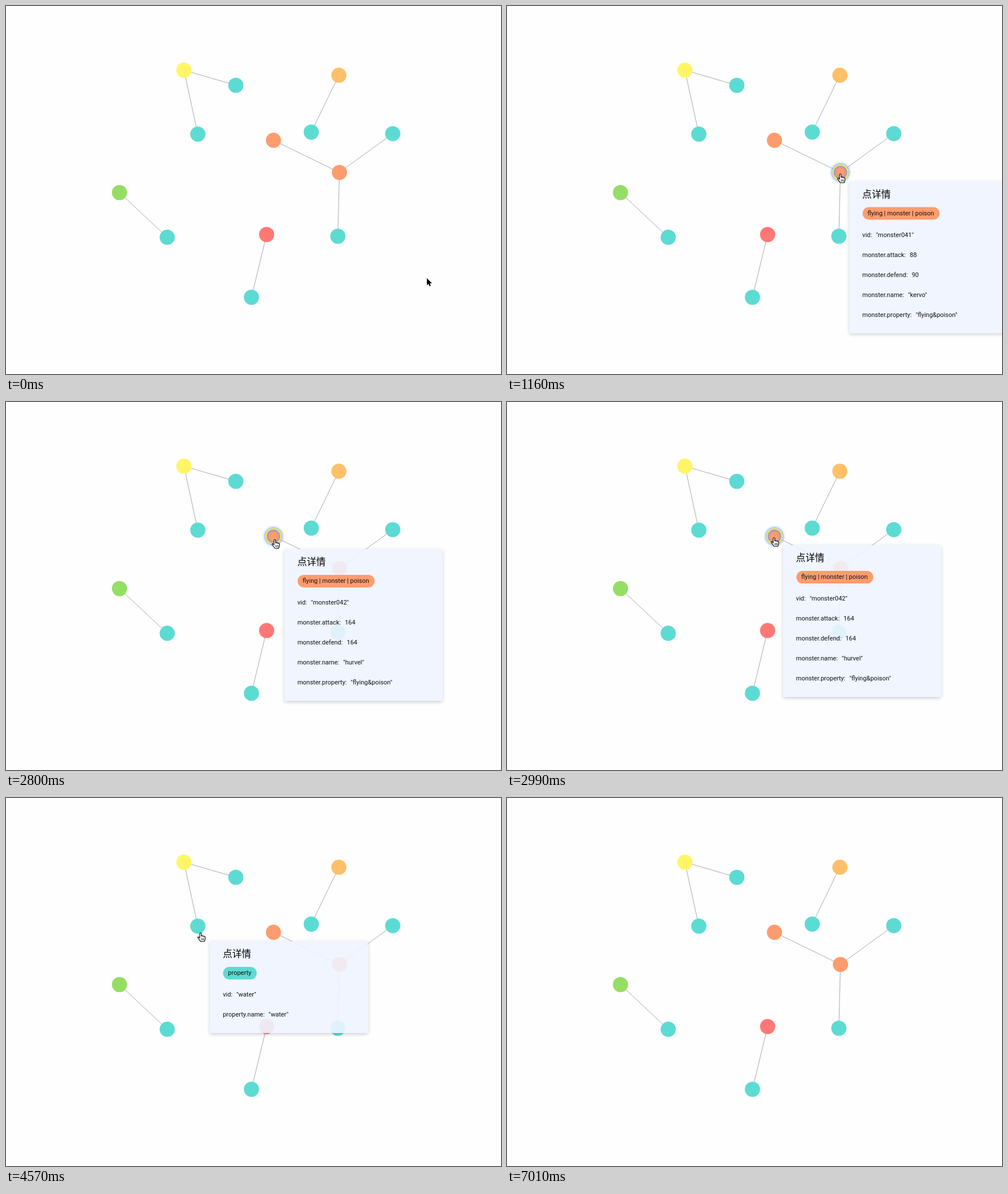
Write an HTML page that moves like this. It is 868 by 645 pixels and loops after 8180 ms.

```html
<!DOCTYPE html>
<html lang="zh">
<head>
<meta charset="utf-8">
<title>Graph hover details</title>
<style>
  html, body { margin: 0; width: 100%; height: 100%; overflow: hidden; background: #fefefe; }
  #stage { position: relative; width: 868px; height: 645px; overflow: hidden; }
  svg { position: absolute; left: 0; top: 0; }
  .panel {
    position: absolute; left: 0; top: 0; width: 277px; border-radius: 3px;
    background: rgba(239, 244, 255, .9); box-shadow: 0 2px 6px rgba(0, 0, 0, .2);
    font: 11px/20px Roboto, sans-serif; color: #111; white-space: pre; visibility: hidden;
  }
  .panel > * { position: absolute; left: 22.5px; }
  .title { top: 9px; font: 500 16.6px/24px "Noto Sans CJK SC", "Noto Sans CJK", sans-serif; color: #000; }
  .tag { top: 45px; height: 22px; line-height: 22px; padding: 0 9.2px; border-radius: 11px; }
  .row span { margin-left: 7px; }
</style>
</head>
<body>
<div id="stage">
  <svg id="graph" width="868" height="645">
    <defs>
      <filter id="glow" x="-60%" y="-60%" width="220%" height="220%"><feGaussianBlur stdDeviation="1.9"/></filter>
    </defs>
    <g id="edges" stroke="#8c8c8c" stroke-width=".75"></g>
    <g id="nodes"></g>
    <g id="halo" fill="none">
      <circle r="13" stroke="#5f95ff" stroke-width="5.5" opacity=".85" filter="url(#glow)"/>
      <circle r="13" stroke="#fbe94b" stroke-width="2.4"/>
    </g>
  </svg>
  <svg width="868" height="645" style="z-index:2">
    <g id="arrow">
      <path d="M0 0V12.6L2.9 9.9L4.8 14.2L6.9 13.3L5.1 9.1H9Z" fill="#000" stroke="#fff" stroke-width="1.6"
        stroke-linejoin="round" paint-order="stroke"/>
    </g>
    <g id="hand">
      <g transform="translate(-5.2 .3)" stroke="#000" stroke-linejoin="round" stroke-linecap="round">
        <path d="M4 9.4V1.6a1.4 1.4 0 0 1 2.8 0V6c.3-1 2.3-.9 2.5.3c.5-.9 2.2-.6 2.3.6c.6-.7 2-.3 2 1v2.3c0 2.2-1.2 2.6-1.4 5.2H5.2c-.3-1.8-2.6-3.6-4.3-6.3C-.1 7.5 1.4 6.7 2.5 7.8Z"
          fill="#fff" stroke-width="1.1"/>
        <path d="M7 10V13M9 10V13M11 10V13" fill="none" stroke-width=".8"/>
      </g>
    </g>
  </svg>
</div>
<script>
const LOOP = 8180;
const TEAL = '#5cdbd3', ORANGE = '#ff9c6e';
const $ = id => document.getElementById(id);

const nodes = [
  [312, 112.5, '#fff566'], [403, 139, TEAL], [336.4, 224.5, TEAL],
  [583.7, 121.3, '#ffc069'], [535.3, 221, TEAL],
  [469, 235.4, ORANGE], [584.7, 291.7, ORANGE], [678.2, 223.7, TEAL], [581.9, 403.5, TEAL],
  [199, 327, '#95de64'], [282.7, 405.4, TEAL],
  [457, 400.5, '#ff7875'], [430.4, 510.5, TEAL]
];
const edges = [[0, 1], [0, 2], [3, 4], [5, 6], [6, 7], [6, 8], [9, 10], [11, 12]];

function add(parent, name, attrs) {
  const el = document.createElementNS('http://www.w3.org/2000/svg', name);
  for (const k in attrs) el.setAttribute(k, attrs[k]);
  parent.append(el);
}
for (const [a, b] of edges) {
  const [x1, y1] = nodes[a], [x2, y2] = nodes[b];
  add($('edges'), 'line', { x1, y1, x2, y2 });
}
for (const [cx, cy, fill] of nodes) add($('nodes'), 'circle', { cx, cy, r: 13.3, fill });

function monster(vid, attack, defend, name) {
  return [
    ['vid', `"${vid}"`], ['monster.attack', attack], ['monster.defend', defend],
    ['monster.name', `"${name}"`], ['monster.property', '"flying&poison"']
  ];
}
const monsterTag = 'flying | monster | poison';

// on/off: panel and hand; lit: halo start
const hovers = [
  { node: 6, on: 920, lit: 940, off: 2390, tag: monsterTag, rows: monster('monster041', 88, 90, 'kervo') },
  { node: 5, on: 2715, lit: 2735, off: 4185, tag: monsterTag, rows: monster('monster042', 164, 164, 'hurvel') },
  { node: 2, on: 4555, lit: 4595, off: 6105, tag: 'property', rows: [['vid', '"water"'], ['property.name', '"water"']] }
];

function div(parent, cls, text) {
  const el = document.createElement('div');
  el.className = cls;
  el.textContent = text;
  parent.append(el);
  return el;
}
for (const h of hovers) {
  h.panel = div($('stage'), 'panel', '');
  h.panel.style.height = 91 + 35 * h.rows.length + 'px';
  div(h.panel, 'title', '点详情');
  div(h.panel, 'tag', h.tag).style.background = nodes[h.node][2];
  h.rows.forEach(([key, value], i) => {
    const row = div(h.panel, 'row', key + ':');
    row.style.top = 84 + 35 * i + 'px';
    const span = document.createElement('span');
    span.textContent = value;
    row.append(span);
  });
}

// pointer path: time, x, y
const path = [
  [0, 738, 477], [30, 738, 477], [290, 728, 496], [560, 678, 415], [830, 629, 323],
  [920, 597, 296], [1020, 587, 293], [1160, 584.3, 294],
  [2300, 584.3, 294], [2450, 548, 281], [2600, 498, 260], [2700, 481, 250], [2770, 472.3, 244.3],
  [2800, 471.2, 240.8], [2990, 468, 237.3],
  [4100, 468, 237.3], [4200, 448, 239], [4320, 404, 242], [4450, 360, 242], [4540, 341.6, 237.4],
  [4570, 341, 235.8], [4720, 338.3, 230],
  [6070, 338.3, 230], [6150, 385, 325], [6250, 475, 510], [6350, 528, 611],
  [6670, 528, 611], [6800, 600, 618], [6920, 700, 631], [7010, 772, 647], [LOOP, 772, 647]
];

function slope(i, k) {
  const a = path[i - 1], b = path[i], c = path[i + 1];
  const rests = p => !p || (p[1] === b[1] && p[2] === b[2]);
  return rests(a) || rests(c) ? 0 : (c[k] - a[k]) / (c[0] - a[0]);
}

function pointer(t) {
  let i = 0;
  while (i < path.length - 2 && path[i + 1][0] <= t) i++;
  const a = path[i], b = path[i + 1], d = b[0] - a[0];
  const u = Math.min(1, Math.max(0, (t - a[0]) / d)), v = 1 - u;
  return [1, 2].map(k =>
    (1 + 2 * u) * v * v * a[k] + u * u * (3 - 2 * u) * b[k] +
    d * u * v * (v * slope(i, k) - u * slope(i + 1, k)));
}

const show = (el, on) => { el.style.visibility = on ? 'visible' : 'hidden'; };

function draw(t) {
  const [x, y] = pointer(t);
  const now = hovers.find(h => t >= h.on && t < h.off);
  for (const h of hovers) show(h.panel, h === now);
  if (now) {
    // the panel trails the pointer slightly
    const [px, py] = pointer(t - 30);
    now.panel.style.transform = `translate(${px + 16.2}px, ${py + 13.7}px)`;
    const [cx, cy] = nodes[now.node];
    $('halo').setAttribute('transform', `translate(${cx} ${cy})`);
  }
  show($('halo'), now && t >= now.lit);
  show($('hand'), now);
  show($('arrow'), !now && t < 7010);
  for (const id of ['hand', 'arrow']) $(id).setAttribute('transform', `translate(${x} ${y})`);
}

const start = performance.now();
function tick() {
  draw((performance.now() - start) % LOOP);
  requestAnimationFrame(tick);
}
tick();
</script>
</body>
</html>
```
